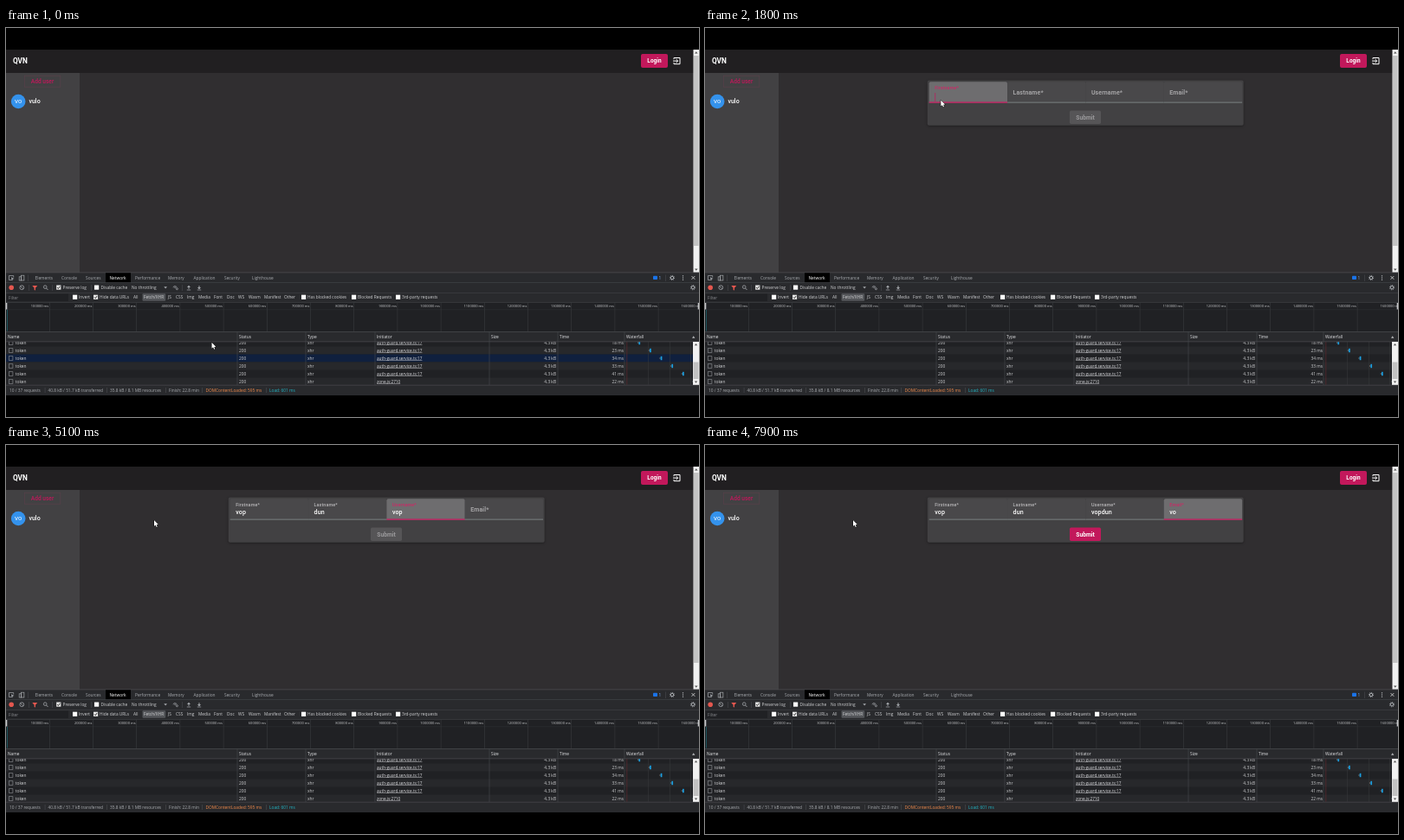
These frames come from a looping animation (800 by 450 pixels, 8 s). An HTML page with a canvas:

```html
<!DOCTYPE html>
<html lang="en">
<head>
<meta charset="utf-8">
<title>Add user form</title>
<style>
html, body { margin: 0; width: 100%; height: 100%; overflow: hidden; background: #000; }
canvas { display: block; width: 800px; height: 450px; }
</style>
</head>
<body>
<canvas id="stage" width="800" height="450"></canvas>
<script>
const ctx = document.getElementById('stage').getContext('2d');
const LOOP = 8000, STEP = 100;
const PINK = '#c2185b', UI = '"Open Sans", sans-serif', APP = 'Roboto, sans-serif';
const clamp = v => Math.max(0, Math.min(1, v));
const ease = v => 1 - (1 - clamp(v)) ** 2;
const mix = (a, b, p) => a + (b - a) * p;

function box(x, y, w, h, fill) {
  ctx.fillStyle = fill;
  ctx.fillRect(x, y, w, h);
}
function round(x, y, w, h, r, fill) {
  ctx.fillStyle = fill;
  ctx.beginPath();
  ctx.roundRect(x, y, w, h, r);
  ctx.fill();
}
function line(points, color, width = 0.7) {
  ctx.strokeStyle = color;
  ctx.lineWidth = width;
  ctx.beginPath();
  points.forEach(([x, y], i) => i ? ctx.lineTo(x, y) : ctx.moveTo(x, y));
  ctx.stroke();
}
function poly(points, fill) {
  ctx.fillStyle = fill;
  ctx.beginPath();
  points.forEach(([x, y]) => ctx.lineTo(x, y));
  ctx.fill();
}
function ring(x, y, r, color, width = 0.8) {
  ctx.strokeStyle = color;
  ctx.lineWidth = width;
  ctx.beginPath();
  ctx.arc(x, y, r, 0, 7);
  ctx.stroke();
}
function disc(x, y, r, fill) {
  ctx.fillStyle = fill;
  ctx.beginPath();
  ctx.arc(x, y, r, 0, 7);
  ctx.fill();
}
function text(s, x, y, font, fill, align = 'left') {
  ctx.font = font;
  ctx.fillStyle = fill;
  ctx.textAlign = align;
  ctx.fillText(s, x, y);
}
// Small tool text, placed by its vertical middle.
const label = (s, x, y, fill = '#d0d1d3', align = 'left', size = 4.8) =>
  text(s, x, y + 1.8, `${size}px ${UI}`, fill, align);

function check(x, y, on) {
  box(x, y - 2.7, 5.2, 5.2, on ? '#e8e8e8' : '#fff');
  if (on) line([[x + 1, y], [x + 2.2, y + 1.3], [x + 4.3, y - 1.5]], '#333', 1);
}
function gear(x, y) {
  ctx.setLineDash([1.1, 0.9]);
  ring(x, y, 2.6, '#a5a8ac', 1);
  ctx.setLineDash([]);
  ring(x, y, 1.7, '#a5a8ac', 1);
}

function drawApp(t) {
  box(0, 25, 800, 258, '#302e30');
  box(0, 25, 794, 27, '#211f21');
  box(0, 52, 85, 231, '#424143');
  text('QVN', 8, 41, `bold 8.3px ${APP}`, '#fff');

  round(733, 30, 31, 16, 2, PINK);
  text('Login', 748.5, 40.3, `bold 6.5px ${APP}`, '#fff', 'center');
  line([[771, 36.2], [771, 34.5], [778, 34.5], [778, 41.7], [771, 41.7], [771, 40]], '#fff', 1);
  line([[770, 38.1], [775.5, 38.1]], '#fff', 1);
  line([[773.5, 36], [775.7, 38.1], [773.5, 40.2]], '#fff', 1);

  const hover = t >= 600 && t < 1000;
  if (hover) box(21, 55, 42, 13.5, '#563848');
  ctx.strokeStyle = hover ? '#82284f' : '#58404a';
  ctx.lineWidth = 0.7;
  ctx.strokeRect(21.3, 55.2, 41.5, 13);
  text('Add user', 42, 64, `500 6.6px ${APP}`, PINK, 'center');

  disc(14.2, 85, 8.3, '#3492ec');
  text('VO', 14.2, 87.3, `500 6.2px ${APP}`, '#e4f0fc', 'center');
  text('vulo', 26.5, 87.2, `500 7px ${APP}`, '#fff');

  box(793.5, 25, 6.5, 258, '#f1f1f1');
  box(794, 32, 5.5, 220, '#c4c4c4');
  poly([[795, 29.5], [798.6, 29.5], [796.8, 27.3]], '#555');
  poly([[795, 278.5], [798.6, 278.5], [796.8, 280.7]], '#555');
}

const fields = [
  { name: 'Firstname*', on: 1400, off: 3200, caret: [[1500, 2000], [2600, 2900]],
    typed: [[2900, 'v'], [3000, 'vo'], [3100, 'vop']] },
  { name: 'Lastname*', on: 3200, off: 4300, caret: [],
    typed: [[3500, 'd'], [3700, 'du'], [3900, 'dun']] },
  { name: 'Username*', on: 4300, off: 6900, caret: [[4600, 5100]],
    typed: [[5100, 'vop'], [5600, 'vo'], [5700, 'vop'], [5800, 'vopd'], [6000, 'vopdu'], [6500, 'vopdun']] },
  { name: 'Email*', on: 6900, off: LOOP, caret: [],
    typed: [[7300, 'v'], [7700, 'vo']] }
];

function drawField(f, i, t) {
  const x = 258.7 + i * 90.35, w = 90.35;
  const lift = ease((t - f.on + STEP) / 300) * (t >= f.on);
  const focus = t >= f.on && t < f.off;
  const glow = focus ? lift : 0;
  const base = i === 0 && t >= 1200 && t < 1400 ? 83 : 73;
  const v = Math.round(mix(base, 110, glow));
  ctx.fillStyle = `rgb(${v},${v - 1},${v + 1})`;
  ctx.beginPath();
  ctx.roundRect(x, 62.3, w, 24, [2, 2, 0, 0]);
  ctx.fill();
  box(x, 85.7, w, 0.8, '#86908e');
  if (focus) box(x + w / 2 * (1 - lift), 85.4, w * lift, 1.3, PINK);

  ctx.letterSpacing = '0.1px';
  text(f.name, x + 6.5, mix(77, 70.8, lift), `${lift > 0.5 ? 500 : 'bold'} ${mix(7, 5.4, lift)}px ${APP}`,
    focus ? '#cb2a66' : lift ? '#b9b8ba' : '#a4a3a5');
  const last = f.typed.filter(([at]) => t >= at).pop();
  if (last) text(last[1], x + 6.5, 80, `500 7.1px ${APP}`, '#fff');
  ctx.letterSpacing = '0px';
  if (f.caret.some(([a, b]) => t >= a && t < b)) box(x + 6.7, 75, 0.7, 10, PINK);
}

function drawForm(t) {
  if (t < 1000) return;
  ctx.save();
  ctx.shadowColor = 'rgba(0,0,0,.35)';
  ctx.shadowBlur = 3;
  ctx.shadowOffsetY = 1;
  round(256.7, 60.5, 365, 52.3, 2, '#424143');
  ctx.restore();
  fields.forEach((f, i) => drawField(f, i, t));
  const ready = t >= 7300;
  round(421, 95.5, 36, 15.5, 1.7, ready ? PINK : '#565557');
  text('Submit', 439, 105.5, `bold 6.7px ${APP}`, ready ? '#fff' : '#9b9a9c', 'center');
}

const tabs = [['Elements', 33.5], ['Console', 64], ['Sources', 92], ['Network', 119.5], ['Performance', 149],
  ['Memory', 187], ['Application', 216.5], ['Security', 252], ['Lighthouse', 284]];
const kinds = [['All', 147], ['Fetch/XHR', 159], ['JS', 187], ['CSS', 196], ['Img', 209], ['Media', 222],
  ['Font', 240], ['Doc', 255], ['WS', 268], ['Wasm', 280], ['Manifest', 298], ['Other', 321]];
const boxes = [['Invert', 77], ['Hide data URLs', 101, true], ['Has blocked cookies', 341],
  ['Blocked Requests', 399], ['3rd-party requests', 450]];
const columns = [['Name', 0], ['Status', 267], ['Type', 346], ['Initiator', 426], ['Size', 558],
  ['Time', 637], ['Waterfall', 714]];
const waits = [18, 23, 34, 33, 41, 22];

function drawBars() {
  const grey = '#a5a8ac', rule = '#44464a';
  box(0, 283, 800, 142, '#292a2d');
  box(0, 282.5, 800, 0.8, '#4a4b4e');
  box(115, 283.3, 29, 11.2, '#000');
  tabs.forEach(([s, x]) => label(s, x, 289, s === 'Network' ? '#fff' : '#a9acb0'));
  line([[7, 291.5], [3.5, 291.5], [3.5, 286.5], [8.7, 286.5], [8.7, 288.5]], grey);
  poly([[5.8, 288.3], [9.5, 290], [7.8, 290.5], [7.2, 292.5]], grey);
  ctx.strokeStyle = grey;
  ctx.strokeRect(15.2, 287.8, 2.6, 4.2);
  ctx.strokeRect(17.6, 286.2, 3.3, 5.8);
  line([[25.5, 285.5], [25.5, 293]], rule);
  round(747, 286.8, 5, 4.2, 0.8, '#1a73e8');
  label('1', 753.5, 289, '#8ab4f8');
  line([[761.5, 285.5], [761.5, 293]], rule);
  gear(769, 289);
  [286.7, 289, 291.3].forEach(y => disc(781.5, y, 0.7, grey));
  line([[791.5, 287], [795.3, 290.8]], '#ccc', 0.9);
  line([[795.3, 287], [791.5, 290.8]], '#ccc', 0.9);
  box(0, 294.4, 800, 0.6, rule);

  disc(6.2, 300.2, 2.8, '#e4574f');
  ring(18.3, 300.2, 2.4, grey);
  line([[16.6, 298.5], [20, 301.9]], grey);
  poly([[30.3, 298], [36.3, 298], [34, 300.8], [34, 303.5], [32.6, 303], [32.6, 300.8]], '#e4574f');
  ring(45.2, 299.6, 1.8, grey);
  line([[46.5, 301], [48.5, 303]], grey, 0.9);
  [26.5, 53.5, 98.5, 203.5].forEach(x => line([[x, 297], [x, 304]], rule));
  check(58.2, 300.2, true);
  label('Preserve log', 65.5, 300.2);
  check(102, 300.2);
  label('Disable cache', 109.5, 300.2);
  label('No throttling', 145, 300.2);
  poly([[182.3, 299.2], [186, 299.2], [184.2, 301.6]], grey);
  [1.4, 2.8].forEach(r => {
    ctx.strokeStyle = grey;
    ctx.lineWidth = 0.8;
    ctx.beginPath();
    ctx.arc(195, 301.5, r, -2.5, -0.6);
    ctx.stroke();
  });
  ring(197.4, 301.7, 1, grey);
  for (const [x, d] of [[211, -1], [223, 1]]) {
    line([[x, 300 - 1.8 * d], [x, 300 + 1.5 * d]], grey, 1);
    poly([[x - 2, 300], [x + 2, 300], [x, 300 + 2.2 * d]], grey);
    line([[x - 2.2, 303], [x + 2.2, 303]], grey);
  }
  gear(793, 300.2);
  box(0, 306, 800, 0.5, rule);

  box(1, 307.5, 71, 8.5, '#202124');
  label('Filter', 3, 311.8, '#85878b');
  boxes.forEach(([s, x, on]) => {
    check(x, 311.4, on);
    label(s, x + 7, 311.5);
  });
  round(157.5, 307.3, 26.7, 8.4, 1, '#54565a');
  kinds.forEach(([s, x]) => label(s, x, 311.5));
}

function drawOverview() {
  box(0, 317, 800, 34, '#202124');
  box(0, 317, 800, 0.6, '#44464a');
  box(0, 325.7, 800, 0.4, '#333539');
  for (let k = 1; k <= 16; k++) {
    const x = k * 50.2;
    box(x - 0.2, 317, 0.6, 34, '#393b3e');
    label(`${k}00000 ms`, x - 1, 321.3, '#c6c8ca', 'right', 4);
  }
  box(0, 318, 1.3, 7.5, '#c9cacc');
  box(798.7, 318, 1.3, 7.5, '#c9cacc');
  box(1.3, 326, 0.7, 24.5, '#1f6d78');
}

function drawTable(t) {
  box(0, 351, 800, 12, '#292a2d');
  box(0, 363, 793, 50, '#202124');
  ctx.save();
  ctx.beginPath();
  ctx.rect(0, 363, 793, 49.8);
  ctx.clip();
  waits.forEach((ms, i) => {
    const y = 364 + i * 9;
    if (i % 2) box(0, y - 4.5, 793, 9, '#27282b');
    if (i === 2 && t < 200) box(0, y - 4.5, 793, 9, '#10203e');
  });
  [741, 766, 790].forEach(x => box(x, 363, 0.5, 50, '#383a3d'));
  box(716.5, 363, 0.7, 50, '#5e2b30');
  waits.forEach((ms, i) => {
    const y = 364 + i * 9, link = i < 5 ? 'auth-guard.service.ts:17' : 'zone.js:2710';
    ctx.strokeStyle = '#8f9296';
    ctx.lineWidth = 0.6;
    ctx.strokeRect(3.3, y - 2.3, 4.6, 4.6);
    label('token', 10.8, y);
    label('200', 269, y);
    label('xhr', 348, y);
    label(link, 428, y, '#dcdde0', 'left', 4.7);
    box(428, y + 2.5, ctx.measureText(link).width, 0.5, '#c4c5c8');
    label('4.3 kB', 635, y, '#d0d1d3', 'right');
    label(`${ms} ms`, 713, y, '#d0d1d3', 'right');
    const x = 730 + i * 12.65;
    box(x - 0.8, y - 1, 1, 2, '#5f6468');
    box(x + 0.4, y - 2.2, 1.7, 4.4, '#1b9fe0');
  });
  ctx.restore();

  box(0, 351, 800, 0.6, '#505256');
  box(0, 362.6, 800, 0.6, '#505256');
  columns.forEach(([s, x]) => {
    if (x) box(x - 0.3, 351, 0.6, 62, '#484a4e');
    label(s, x + 2, 357.5, '#e2e3e5');
  });
  poly([[792, 358.7], [795.4, 358.7], [793.7, 356.2]], '#b8babd');

  box(793, 363, 7, 50, '#f1f1f1');
  box(793.6, 386.5, 5.8, 19.5, '#c1c1c1');
  poly([[794.8, 367.3], [798.2, 367.3], [796.5, 365]], '#555');
  poly([[794.8, 408.5], [798.2, 408.5], [796.5, 410.8]], '#555');
}

function drawStatus() {
  box(0, 412.8, 800, 0.6, '#505256');
  const grey = '#a9acb0';
  [['10 / 37 requests', 4], ['40.8 kB / 51.7 kB transferred', 48.5], ['35.8 kB / 8.1 MB resources', 120],
    ['Finish: 22.8 min', 188], ['DOMContentLoaded: 595 ms', 230.5, '#f08a4b'], ['Load: 601 ms', 304, '#22b5c4']
  ].forEach(([s, x, c]) => label(s, x, 419, c || grey));
  [44.8, 116, 184, 226.5, 300].forEach(x => box(x, 416, 0.5, 6, '#505256'));
}

// Pointer stops: time, x, y
const path = [[0, 237.5, 363.7], [600, 44, 62], [900, 44, 62], [1200, 272.3, 83.6],
  [2500, 272.3, 83.6], [2900, 171, 87]];

function drawPointer(t) {
  let x = 171, y = 87;
  for (let i = 1; i < path.length; i++) {
    const [a, x0, y0] = path[i - 1], [b, x1, y1] = path[i];
    if (t >= a && t < b) {
      const p = (t - a) / (b - a);
      x = mix(x0, x1, p);
      y = mix(y0, y1, p);
      break;
    }
  }
  ctx.save();
  ctx.translate(x, y);
  ctx.lineJoin = 'round';
  ctx.strokeStyle = '#000';
  ctx.lineWidth = 0.9;
  const shape = t >= 600 && t <= 900
    ? [[0.4, 0], [1.5, 0], [1.8, 3], [4.3, 3.6], [4.6, 5.5], [3.8, 8.6], [0.2, 8.6], [-2, 5.5], [-1.4, 4.8], [0.2, 6]]
    : [[0, 0], [0, 7], [1.6, 5.6], [2.7, 8], [3.8, 7.5], [2.8, 5.2], [4.9, 5]];
  ctx.beginPath();
  shape.forEach(([px, py]) => ctx.lineTo(px, py));
  ctx.closePath();
  ctx.stroke();
  ctx.fillStyle = '#fff';
  ctx.fill();
  ctx.restore();
}

function frame(now) {
  const t = Math.floor(now % LOOP / STEP) * STEP;
  box(0, 0, 800, 450, '#000');
  drawApp(t);
  drawForm(t);
  drawBars();
  drawOverview();
  drawTable(t);
  drawStatus();
  drawPointer(t);
  requestAnimationFrame(() => frame(performance.now() - start));
}
const start = performance.now();
frame(0);
</script>
</body>
</html>
```
